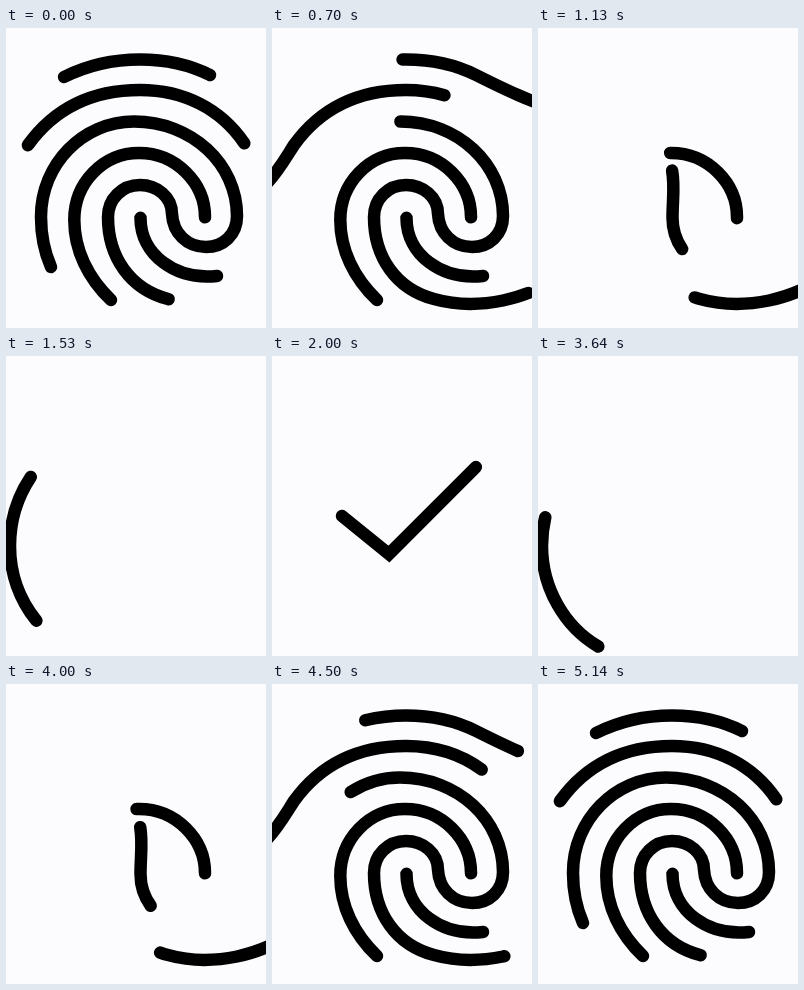
Recreate the animation shown at these times as an HTML page with a canvas. Size 260 by 300 pixels, loop 5170 ms.

```html
<!DOCTYPE html>
<html lang="en">
<head>
<meta charset="utf-8">
<title>Fingerprint to check mark</title>
<style>
  html, body { margin: 0; width: 100%; height: 100%; overflow: hidden; background: #fcfcff; }
  canvas { display: block; width: 260px; height: 300px; }
</style>
</head>
<body>
<canvas id="stage"></canvas>
<script>
const W = 260, H = 300, LOOP = 5170;
const MIRROR = 5130;   // the way back at time t shows the pose of MIRROR - t
const END = 1925;      // check mark complete
const CHECK = 184;     // length of the check mark

const canvas = document.getElementById('stage');
const ctx = canvas.getContext('2d');
const ratio = window.devicePixelRatio || 1;
canvas.width = W * ratio;
canvas.height = H * ratio;

function pathLength(d) {
  const p = document.createElementNS('http://www.w3.org/2000/svg', 'path');
  p.setAttribute('d', d);
  return p.getTotalLength();
}

// Distance covered since start (ms): speed * seconds ^ power
const ramp = (t, start, speed, power) =>
  speed * Math.pow(Math.max(0, t - start) / 1000, power);

// Share of a run between two times, 0 to 1
const share = (t, from, to, power) =>
  Math.pow(Math.min(1, Math.max(0, (t - from) / (to - from))), power);

// body: resting ridge, exit: the track it slides along afterwards
function ridge(body, exit, tail, head) {
  const d = body + exit;
  return { path: new Path2D(d), rest: pathLength(body), total: pathLength(d), tail, head };
}

const ridges = [
  // upper arc, leaves to the right
  ridge('M58,49 C80,38 106,31.5 134,31.5 C160,31.5 184,37 204,47',
        ' C218,54 232,61 246,67 C264,75 282,82 340,98',
        t => ramp(t, 430, 1420, 2.25),
        (t, r) => r.rest + ramp(t, 430, 1750, 2.25)),
  // wide arc, leaves to the left
  ridge('M238.3,115.3 C215,81 178,62 134,62 C84,62 48,81 22,117',
        ' C13,131 7,142 -4,154 L-60,211',
        t => ramp(t, 430, 1570, 2.25),
        (t, r) => r.rest + ramp(t, 430, 1750, 2.25)),
  // long winding ridge, leaves at the lower right
  ridge('M45,239 C38,223 35,206 35,189 C35,136 77,93.5 128,93.5 C186,93.5 231,136 231,188' +
        ' C231,207 217,219 200,219 C181,219 167,205 166,186' +
        ' C166,169 151,157 134,157 C116,157 102,171 102,189 C102,229 124,261 162,271',
        ' C185,277.5 209,277 231,272.5 C242,270 252,267 262,262.5 L340,232',
        t => ramp(t, 230, 798, 1.84),
        (t, r) => r.rest + ramp(t, 230, 378, 1.83)),
  // core, slips upwards and away to the left
  ridge('M211,248 C170,252.5 134.5,227 134.5,190',
        ' C134.5,172 137,158 134,142 C128,105 80,90 0,118 L-60,140',
        t => ramp(t, 800, 689, 2),
        (t, r) => r.rest + ramp(t, 800, 432, 2)),
  // inner arc, circles the print once and folds into the check mark
  ridge('M105,272 C82,250 68.3,222 68.3,192 C68.3,155 97,125 133,125 C170,125 199,155 199,189',
        ' C199,250 165,302 110,304 C50,304 4,250 4,190 C4,120 60,65 134,65' +
        ' C168,65 196,79 217,98 L117,198 L70,160',
        (t, r) => (r.total - CHECK) * share(t, 850, END, 1.18),
        (t, r) => r.rest + (r.total - r.rest) * share(t, 1130, END, 1.04))
];

function draw(time) {
  const t = Math.min(time, MIRROR - time);
  ctx.setTransform(ratio, 0, 0, ratio, 0, 0);
  ctx.fillStyle = '#fcfcff';
  ctx.fillRect(0, 0, W, H);
  ctx.strokeStyle = '#000';
  ctx.lineWidth = 12.5;
  ctx.lineCap = 'round';
  ctx.lineJoin = 'miter';
  for (const r of ridges) {
    const tail = r.tail(t, r);
    const head = Math.min(r.head(t, r), r.total);
    if (head - tail < 0.5) continue;
    ctx.setLineDash([head - tail, 9999]);
    ctx.lineDashOffset = -tail;
    ctx.stroke(r.path);
  }
}

function frame() {
  draw(performance.now() % LOOP);
  requestAnimationFrame(frame);
}
frame();
</script>
</body>
</html>
```
